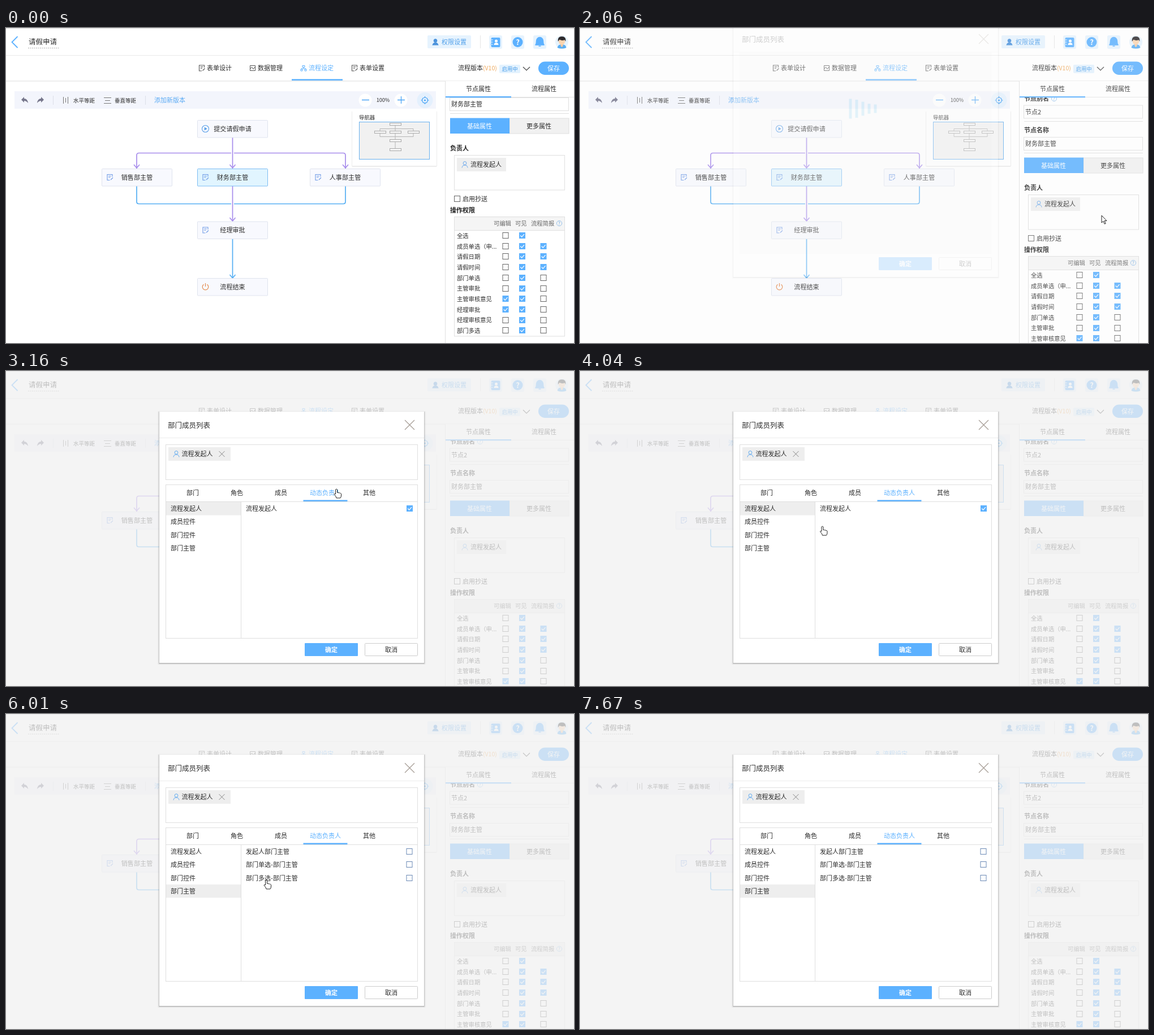
These frames come from a looping animation (1004x558 px, 8230 ms). An HTML page:

```html
<!DOCTYPE html>
<html lang="zh">
<head>
<meta charset="utf-8">
<style>
html,body{margin:0;width:100%;height:100%;overflow:hidden;background:#fff}
svg{display:block;width:1004px;height:558px}
text{font-family:"Noto Sans CJK SC","Noto Sans CJK","Noto Sans",sans-serif;white-space:pre}
</style>
</head>
<body>
<svg id="stage" viewBox="0 0 1004 558" xmlns="http://www.w3.org/2000/svg"></svg>
<script>
const BLUE = '#5cb1ff', INK = '#2b2b2b', LINE = '#dfdfdf';
const VIOLET = '#a68ceb', SKY = '#55aef3';

// ---- drawing helpers (text is placed by its vertical centre) ----
const text = (x, y, s, size = 11, fill = INK, extra = '') =>
  `<text x="${x}" y="${y + size * .37}" font-size="${size}" fill="${fill}" ${extra}>${s}</text>`;
const mid = (x, y, s, size, fill, extra = '') => text(x, y, s, size, fill, 'text-anchor="middle" ' + extra);
const bold = (x, y, s) => text(x, y, s, 11, '#222', 'font-weight="700"');
const rect = (x, y, w, h, fill, stroke = 'none', r = 0, extra = '') =>
  `<rect x="${x}" y="${y}" width="${w}" height="${h}" rx="${r}" fill="${fill}" stroke="${stroke}" ${extra}/>`;
const path = (d, stroke, w = 1, fill = 'none', extra = '') =>
  `<path d="${d}" stroke="${stroke}" stroke-width="${w}" fill="${fill}" ${extra}/>`;
const circle = (x, y, r, fill, stroke = 'none', w = 1) =>
  `<circle cx="${x}" cy="${y}" r="${r}" fill="${fill}" stroke="${stroke}" stroke-width="${w}"/>`;
const at = (x, y, body, id = '') => `<g ${id && `id="${id}"`} transform="translate(${x} ${y})">${body}</g>`;
const group = (id, body) => `<g id="${id}">${body}</g>`;

const check = (x, y, on, edge = '#666') => on
  ? rect(x - 5.5, y - 5.5, 11, 11, BLUE) + path(`M${x - 3.3} ${y}l2.5 2.6 4.3-5`, '#fff', 1.2)
  : rect(x - 5, y - 5, 10, 10, '#fff', edge);
const person = (x, y, c = BLUE, fill = 'none') => at(x, y,
  circle(0, -2.5, 2.9, fill, c) + path('M-5 5.5Q-4.5 1 0 1T5 5.5', c, 1, fill));
const note = (x, y, c) => at(x, y,
  path('M4.5-1V-5h-9V5H0M-2.3-2.3h4.6M-2.3.2H1M1.5 4.5l4-4', c, 1.1));
const help = (x, y) => circle(x, y, 4.6, 'none', '#8dbbe8', .9) + mid(x, y, '?', 8, '#6ba6df');
const cross = (x, y, r, c, w) => path(`M${x - r} ${y - r}l${2 * r} ${2 * r}m0 ${-2 * r}l${-2 * r} ${2 * r}`, c, w);
const loader = id => group(id, [0, 1, 2, 3, 4].map(() => rect(0, 0, 5, 20, '#85cdee')).join(''));

// ---- page ----
function header() {
  const tabs = [[355, '表单设计'], [445, '数据管理'], [535, '流程设定'], [625, '表单设置']];
  const icons = [
    path('M-6.5 5V-5a2 2 0 0 1 2-2h3M-9 4h2', BLUE, 1) + rect(-8, -8, 16, 17, BLUE, 'none', 2) +
      circle(1, -2, 2.5, '#fff') + path('M-3 5Q-3 1 1 1T5 5z', 'none', 0, '#fff') + path('M-8-4h3m-3 4h3m-3 4h3', '#fff', 1),
    circle(0, 0, 9, BLUE) + mid(0, 0, '?', 13, '#fff', 'font-weight="700"'),
    path('M-8 5Q-6 4-6-2A6 6.5 0 0 1 6-2Q6 4 8 5zM-2 7h4', BLUE, 1.5, BLUE)
  ];
  return rect(0, 0, 1004, 93, '#fff') +
    path('M0 .5H1004', '#d8d8d8') + path('M0 48.5H1004', '#e9e9e9') +
    path('M20.5 15l-10 10 10 10', BLUE, 1.8) +
    text(40, 24, '请假申请', 12.5) + path('M39 35.5H95', '#aaa', 1, 'none', 'stroke-dasharray="2 1.5"') +
    rect(745, 13, 77, 23, '#e6f3fe', 'none', 2) + person(759, 25, '#4a92dc', '#4a92dc') +
    text(770, 25, '权限设置', 11, '#4f9fea') + path('M838.5 13V36', '#e5e5e5') +
    icons.map((d, i) => rect(854 + i * 39, 13, 23, 24, '#e6f3fe', 'none', 3) + at(865.5 + i * 39, 25, d)).join('') +
    circle(982.5, 25, 11.5, '#e6f3fe') +
    at(982.5, 25, path('M-8 10Q-7 4 0 4T8 10Q0 13-8 10z', 'none', 0, '#5aaef2') +
      path('M-2 3h4v4l-2 2-2-2z', 'none', 0, '#f7c9a0') + circle(0, -1, 5.6, '#fbd5b0') +
      path('M-6.8-1Q-8-10 0-10T6.8-1L5-4Q0-2-4-4.5z', 'none', 0, '#2d2a2c')) +
    tabs.map(([x, s], i) => text(x, 71, s, 11, i == 2 ? BLUE : INK) + (i == 2
      ? at(x - 9, 71, path('M-2-4.5h4v3h-4zM0-1.5V1M-4 2V1h8v1M-5 2h3v3h-3zM2 2h3v3H2z', BLUE))
      : i == 1 ? at(x - 9, 71, path('M-4.5-4.5h9v9h-9zM-4 1l2.5-3L1 2l3-4', '#555')) : note(x - 9, 71, '#555'))).join('') +
    text(799, 71, '流程版本') + text(843, 71, '(V10)', 10.5, '#eda75a') +
    rect(872, 65, 37, 15, '#e3f2fe', 'none', 2) + text(876.5, 72.5, '启用中', 9.4, '#459be9') +
    path('M914 69l6 6 6-6', '#444', 1.2) +
    rect(941, 59.5, 54, 23.5, BLUE, 'none', 11.7) + mid(968, 71.5, '保存', 11, '#fff') +
    rect(0, 93, 1004, 2, '#eeeeee') + rect(505, 90.5, 90, 2.5, BLUE);
}

function toolbar() {
  const undo = path('M-6-1l5-5v3Q5-3 6 5Q3 1-1 1v3z', 'none', 0, '#77778c');
  return rect(15, 112, 745, 31, '#f3f5fc') + at(33, 128, undo) +
    `<g transform="translate(61 128) scale(-1 1)">${undo}</g>` +
    path('M83.5 120V136M246.5 120V136', '#dcdfe8') +
    path('M101.5 122v12M105.5 124v8M109.5 122v12', '#777') + text(119, 128.5, '水平等距', 9.5) +
    path('M173 123.5h13M175 128.5h9M173 133.5h13', '#777', 1.2) + text(192, 128.5, '垂直等距', 9.5) +
    text(262, 127.5, '添加新版本', 11, '#5aaaf4') +
    circle(635, 128, 11.5, '#fff') + circle(698, 128, 11.5, '#fff') + circle(740.5, 128, 14, '#e4f0fd') +
    path('M629 127.5h13M692 127.5h13M698.5 121v13', '#4ba5f5', 1.3) + mid(666.5, 128, '100%', 9, INK) +
    circle(740.5, 128, 5, 'none', '#4ba5f5', 1.2) + circle(740.5, 128, 1.6, '#4ba5f5') +
    path('M740.5 121v3m0 8v3M733.5 128h3m8 0h3', '#4ba5f5', 1.2);
}

const nodes = [[338, 163, '提交请假申请'], [169, 249, '销售部主管'], [338, 249, '财务部主管'],
  [537, 249, '人事部主管'], [338, 342.5, '经理审批'], [338, 443, '流程结束']];

function flow() {
  const tip = (x, y, c) => path(`M${x - 5} ${y - 6}l5 6 5-6`, c, 1.6);
  const icon = (x, y, i) => i == 0
    ? circle(x, y, 6, 'none', '#5a9fe8', 1.1) + path(`M${x - 1.8} ${y - 3}l5 3-5 3z`, 'none', 0, '#5a9fe8')
    : i == 5 ? path(`M${x - 3} ${y - 4.3}a5.3 5.3 0 1 0 6 0M${x} ${y - 6.5}v6`, '#e58a4e', 1.2) : note(x, y, '#6f9be6');
  return path('M231 249V225.500q0-4 4-4H596q4 0 4 4V249', VIOLET, 1.7) +
    path('M231 280V307.500q0 4 4 4H596q4 0 4-4V280', SKY, 1.7) +
    path('M400.5 216V227M400.5 306V317', '#fff', 5) +
    path('M400.5 194V248M400.5 280V342', VIOLET, 1.7) + path('M400.5 374V443', SKY, 1.7) +
    tip(231, 248, VIOLET) + tip(400.5, 248, VIOLET) + tip(600, 248, VIOLET) +
    tip(400.5, 342, VIOLET) + tip(400.5, 443, SKY) +
    nodes.map(([x, y, s], i) => rect(x + .5, y + .5, 124, 30.5, i == 2 ? '#e1f5ff' : '#f8f9fe', i == 2 ? '#7cbcf3' : '#dfe3ee', 1) +
      icon(x + 14.5, y + 15.5, i) + mid(x + 62.5, y + 15.5, s, 11.1, INK)).join('');
}

function navigator() {
  const mini = [[678, 168], [651, 182], [678, 182], [710, 182], [678, 197], [678, 213]];
  return rect(611, 147, 151, 99, '#ececec', 'none', 2) + rect(612, 147, 149, 97, '#fff') +
    text(624, 158.500, '导航器', 9.4) + rect(624.5, 166.500, 124, 66, '#f1f1f1', '#68b0ee') +
    path('M688 173V213M661 182V178.500H720V182M661 187V192.500H720V187', '#b5b5b5') +
    mini.map(([x, y]) => rect(x + .5, y + .5, 20, 4, '#f4f4f4', '#aaa')).join('');
}

function panel() {
  const rows = ['全选', '成员单选（申...', '请假日期', '请假时间', '部门单选', '主管审批', '主管审核意见', '经理审批', '经理审核意见', '部门多选'];
  const field = (y, s) => rect(784.5, y - 11.5, 210, 23, '#fff', LINE) + text(787, y, s);
  const table = rect(792.5, 404.5, 195, 211.500, '#fff', LINE) + rect(793, 405, 194, 23, '#f5f5f5') +
    path('M793 428.500H987', LINE) +
    [[862, '可编辑'], [900, '可见'], [928, '流程简报']].map(([x, s]) => text(x, 416.500, s, 10.3, '#666')).join('') + help(978, 416) +
    rows.map((s, i) => {
      const y = 438 + i * 18.7, b = Math.round(y) - .5;
      return text(797, y, s, 10.3) + check(883, b, i == 6 || i == 7) + check(912.500, b, true) +
        (i ? check(950, b, i < 4) : '');
    }).join('');
  const body = text(785, 125, '节点别名', 11, '#222', 'font-weight="700"') + help(838, 125) + field(148.500, '节点2') +
    path('M785 165.500H995M785 221.500H995', LINE) + bold(785, 181, '节点名称') + field(205, '财务部主管') +
    rect(890, 230, 105, 27, '#f1f1f1', LINE) + rect(785, 229.500, 105, 27.500, BLUE) +
    mid(837, 243.500, '基础属性', 11, '#fff') + mid(942, 243.500, '更多属性', 11, INK) +
    bold(785, 283, '负责人') +
    group('owner', rect(792.5, 295.500, 195, 61.500, '#fff', LINE) + rect(797, 300, 87, 24, '#eee') +
      person(811, 312, '#69a7ec') + text(821, 312, '流程发起人')) +
    group('lower', check(797.500, 372.500) + text(807, 373, '启用抄送') + bold(785, 393, '操作权限') + table);
  return rect(777, 94, 227, 464, '#fff') +
    `<g clip-path="url(#clip)">${group('scroll', body)}</g>` + loader('load1') +
    path('M776.500 94V558', '#e0e0e0') + path('M777 122.500H1004', '#e4e4e4') + rect(777, 121, 116, 2.300, BLUE) +
    mid(835, 107.500, '节点属性', 11, INK) + mid(951, 107.500, '流程属性', 11, INK);
}

// ---- dialog ----
function dialog() {
  const tabs = [['部门', 330], ['角色', 408], ['成员', 486], ['动态负责人', 564.5], ['其他', 642]];
  const rowY = i => 243.500 + i * 23.500;
  const list = (x, items) => items.map((s, i) => text(x, rowY(i), s)).join('');
  return rect(268, 71, 474, 449, '#000', 'none', 2, 'opacity=".05"') +
    rect(270, 72, 470, 447, '#000', 'none', 1, 'opacity=".16"') +
    rect(271, 72, 468, 445, '#fff') + text(286, 96, '部门成员列表', 12.5) + cross(713.500, 95.500, 8.500, '#a59c94', 1.2) +
    path('M271 118.500H739', '#ededed') +
    group('wait', rect(282, 119, 445, 357, '#f8f8f8') + loader('load2')) +
    group('body', rect(282.5, 130.500, 445, 62, '#fff', LINE) + rect(287, 135, 110, 24, '#eee') +
      person(301, 147, '#5fa9f0') + text(310.500, 147, '流程发起人') + cross(381.500, 147, 5, '#888', 1) +
      rect(282.5, 201.500, 445, 272, '#fff', LINE) + path('M283 231.500H727M415.500 232V473', LINE) +
      tabs.map(([s, x], i) => mid(x, 216, s, 11, INK, `id="tab${i}"`)).join('') +
      rect(0, 228.500, 78, 2.500, BLUE, 'none', 0, 'id="bar"') +
      group('lists', rect(283, 0, 132, 23.500, '#eee', 'none', 0, 'id="hot"') +
        list(291, ['流程发起人', '成员控件', '部门控件', '部门主管']) +
        group('listA', list(424, ['流程发起人']) + check(713.500, 243.500, true)) +
        group('listB', list(424, ['发起人部门主管', '部门单选-部门主管', '部门多选-部门主管']) +
          [0, 1, 2].map(i => check(713, Math.round(rowY(i)) - .5, false, '#6b89b5')).join('')))) +
    rect(528, 482, 94, 23, BLUE, 'none', 1) + mid(575, 493.500, '确定', 11, '#fff', 'font-weight="700"') +
    rect(634.5, 482.500, 93, 22, '#fff', '#ccc', 1) + mid(681, 493.500, '取消', 11, INK);
}

// ---- pointers, hot spot at 0,0 ----
const pointers =
  group('arrow', path('M0 0V13l3-2.800 2.200 5 2-.9-2.200-4.800H9z', '#222', 1, '#fff')) +
  group('hand', path('M-1.500 1Q0-1 1.500 1V6.500Q3 5.500 4 7 5.500 6 6.500 7.500 8 7 8.500 8.500V12Q8.500 14 7 16H0Q-1-13 -1 13L-4 9.500Q-4 7.500-1.500 9z'.replace('Q-1-13 -1 13', 'L-1 13'), '#222', 1, '#fff')) +
  group('move', path('M0-9l3.500 3.500H1.500v4h4v-2L9 0 5.500 3.500v-2h-4v4h2L0 9-3.500 5.500h2v-4h-4v2L-9 0l3.500-3.500v2h4v-4h-2z', '#222', 1, '#fff'));

const stage = document.getElementById('stage');
stage.innerHTML = '<defs><clipPath id="clip"><rect x="777" y="123" width="227" height="435"/></clipPath></defs>' +
  rect(0, 0, 1004, 558, '#fff') + header() + toolbar() + flow() + navigator() + panel() +
  rect(0, 0, 1004, 558, '#f0f0f0', 'none', 0, 'id="mask"') + group('dialog', dialog()) + group('pointer', pointers);
const el = id => document.getElementById(id);
const set = (id, o) => { for (const k in o) el(id).setAttribute(k, o[k]); };
const show = (id, on) => set(id, { display: on ? 'inline' : 'none' });

// ---- time ----
const LOOP = 8230;
// bursts of change: first, last, number of steps
const bursts = [[150, 630, 7], [870, 1660, 11], [1740, 1900, 3], [2060, 2840, 11], [2920, 3160, 4],
  [3560, 4360, 11], [4440, 5230, 11], [5310, 6090, 11], [6160, 6640, 7], [6960, 7670, 10]];
// pointer route: time, x, y
const route = [[150, 470, 545], [630, 405, 266], [870, 405, 266], [1028, 564, 271], [1660, 880, 352],
  [1900, 922, 332], [2300, 922, 332], [3000, 584, 209], [3560, 584, 209], [4360, 344, 311], [4900, 344, 311],
  [5400, 463, 254], [6010, 460, 294], [6160, 460, 294], [6640, 495, 275], [6960, 495, 275], [7670, 560, 572]];

function snap(t) {
  let q = 0;
  for (const [a, b, n] of bursts) {
    if (t < a) break;
    const d = (b - a) / (n - 1);
    q = a + d * Math.min(n - 1, Math.floor((t - a + 3) / d));
  }
  return q;
}

function where(q) {
  let i = 0;
  while (i < route.length - 2 && q >= route[i + 1][0]) i++;
  const [a, x, y] = route[i], [b, u, v] = route[i + 1];
  let p = Math.max(0, Math.min(1, (q - a) / (b - a)));
  p = p * p * (3 - 2 * p);
  return [x + (u - x) * p, y + (v - y) * p];
}

function kind(x, y, open) {
  if (!open) return nodes.some(([a, b]) => x > a && x < a + 125 && y > b && y < b + 31) ? 'move' : 'arrow';
  const tab = y > 201 && y < 231 && x > 290 && x < 680;
  const left = y > 231 && y < 326 && x > 283 && x < 415;
  const right = y > 231 && y < 302 && x > 416 && x < 727;
  return tab || left || right ? 'hand' : 'arrow';
}

function pulse(id, cx, cy, q) {
  [...el(id).children].forEach((bar, i) => {
    const h = 25 + 10 * Math.cos((q - 2060) * 2 * Math.PI / 812 - i * .8);
    bar.setAttribute('x', cx - 24.5 + i * 11);
    bar.setAttribute('y', cy - h / 2);
    bar.setAttribute('height', h);
  });
}

function draw(time) {
  const q = snap(time % LOOP);
  const loading = q >= 870 && q < 1500, open = q >= 2060, ready = q >= 2500;
  const picked = q >= 3080, chief = q >= 4440;

  set('scroll', { transform: `translate(0 ${q < 870 ? -70 : 0})` });
  set('lower', { transform: `translate(0 ${loading ? -70 : 0})` });
  show('owner', !loading);
  show('load1', loading);
  pulse('load1', 885, 347, q);

  const fade = open ? Math.min(1, .22 + (q - 2060) / 100) : 0;
  const drop = -76 * (1 - Math.max(0, Math.min(1, (q - 2060) / 220))) ** 2;
  set('mask', { opacity: .75 * fade });
  show('dialog', open);
  set('dialog', { opacity: fade, transform: `translate(0 ${drop})` });
  show('wait', !ready);
  show('body', ready);
  pulse('load2', 500, 219, q);
  set('tab0', { fill: picked ? INK : BLUE });
  set('tab3', { fill: picked ? BLUE : INK });
  set('bar', { x: picked ? 525.5 : 291 });
  show('lists', picked);
  set('hot', { y: chief ? 302 : 232 });
  show('listA', !chief);
  show('listB', chief);

  const [x, y] = where(q), k = kind(x, y, open);
  show('pointer', q >= 150 && q < 7670);
  set('pointer', { transform: `translate(${x} ${y})` });
  for (const id of ['arrow', 'hand', 'move']) show(id, id == k);
}

const start = performance.now();
function tick() {
  draw(performance.now() - start);
  requestAnimationFrame(tick);
}
tick();
</script>
</body>
</html>
```
